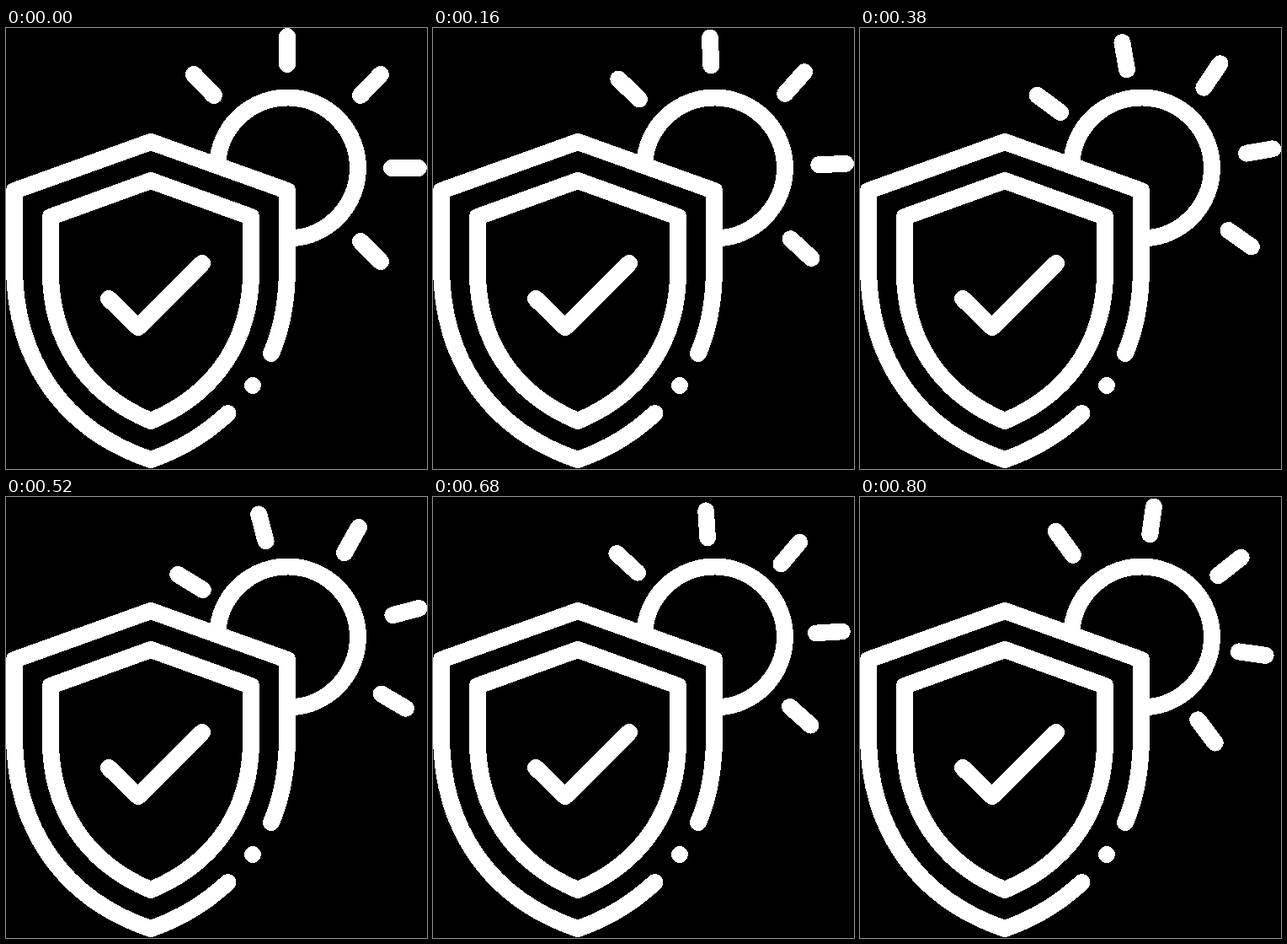
An HTML page that plays this animation: 500 by 523 pixels, repeating every 2 s.

```html
<!DOCTYPE html>
<html lang="en">
<head>
<meta charset="utf-8">
<title>Sun protection</title>
<style>
  html, body { margin: 0; width: 100%; height: 100%; overflow: hidden; background: #000; }
  svg { display: block; shape-rendering: crispEdges; }
  .line { fill: none; stroke: #fff; stroke-width: 20; stroke-linecap: round; stroke-linejoin: round; }
</style>
</head>
<body>
<svg width="500" height="523" viewBox="0 0 500 523">
  <g class="line">
    <!-- sun -->
    <path stroke-linecap="butt" d="M251 162A83.5 83.5 0 1 1 335 249.5"/>
    <path id="rays" d="M334 10V43M458 166H490M223 55L247 80M445 55L421 80M421 253L445 277"/>
    <!-- shield -->
    <path d="M315 386C328.5 355 334 320 334 283V193L172 135L10 193V283C10 393 68 477 172 512Q224 494 263.5 457"/>
    <path d="M172 181L291 224V289C291 368 251 433 172 466C93 433 53 368 53 289V224Z"/>
    <path d="M122 321L157 355L233 279"/>
  </g>
  <circle cx="293" cy="424" r="10" fill="#fff"/>
</svg>
<script>
  const LOOP = 2000, STEP = 20;
  const TURN = 560, END = 800;
  const CX = 356.5, CY = 143.5;
  const rays = document.getElementById('rays');

  // Matrix of a rotation about the middle of the rays, then a shift
  function pose(deg, dx = 0, dy = 0) {
    const a = deg * Math.PI / 180, c = Math.cos(a), s = Math.sin(a);
    return [c, s, -s, c, CX - c * CX + s * CY + dx, CY - s * CX - c * CY + dy];
  }

  const rest = pose(0), left = pose(-15, -0.9, 0.4), right = pose(8, -3.9, 3.5);

  // Entries blend directly, so the rays draw in slightly mid-swing
  const mix = (a, b, p) => a.map((v, i) => v + (b[i] - v) * p);

  // Soft start, then constant speed
  const swing = t => t < 160
    ? 0.145 * Math.pow(t / 160, 2.6)
    : Math.min(1, 0.145 + 0.0023 * (t - 160));

  function matrixAt(t) {
    if (t < TURN) return mix(rest, left, swing(t));
    return mix(left, right, Math.min(1, (t - TURN) / (END - TURN)));
  }

  function draw() {
    const t = Math.floor(performance.now() % LOOP / STEP) * STEP;
    rays.setAttribute('transform', `matrix(${matrixAt(t).map(v => v.toFixed(5))})`);
    requestAnimationFrame(draw);
  }
  draw();
</script>
</body>
</html>
```
